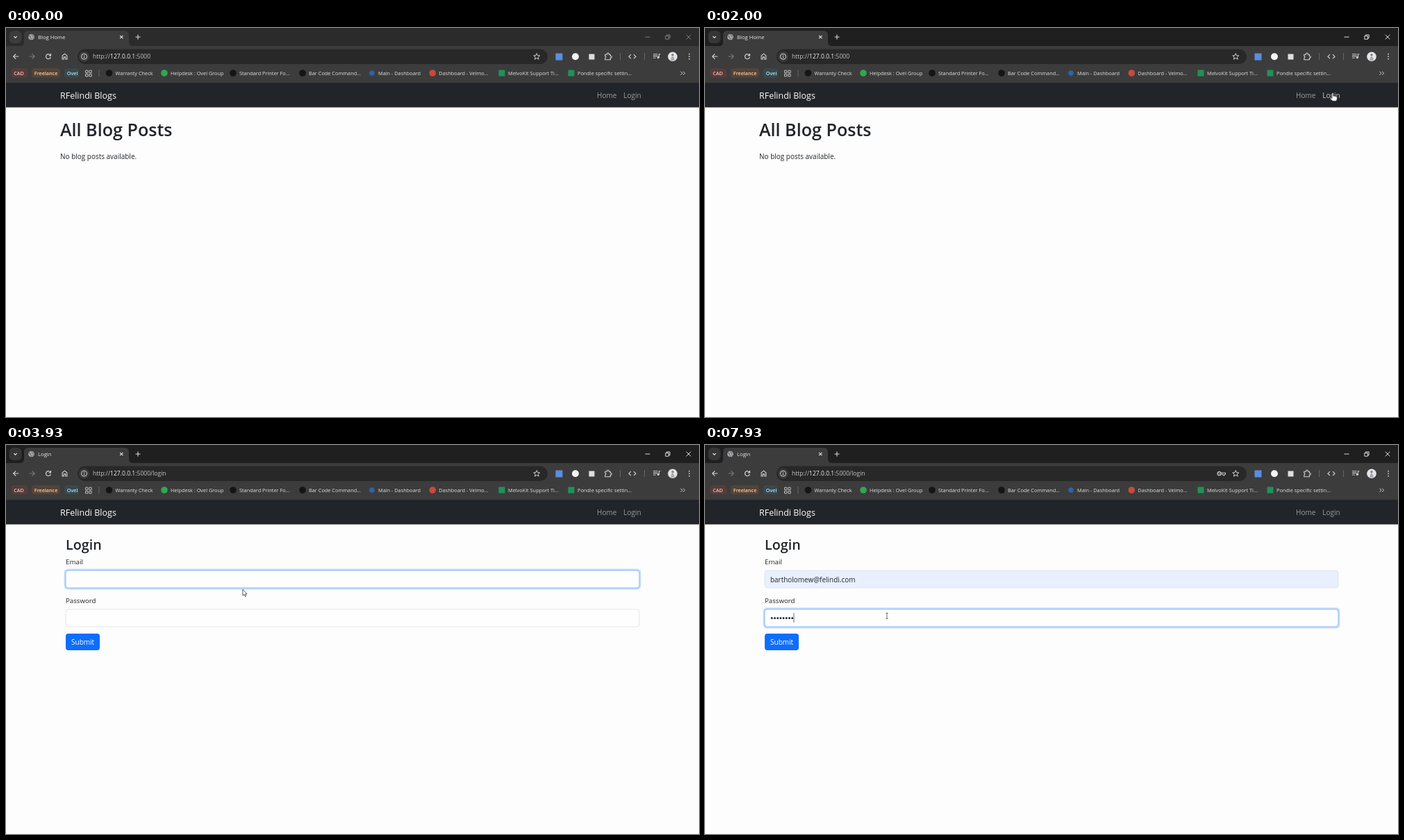
Recreate the animation shown at these times as an HTML page with a canvas. Size 998 by 561 pixels, loop 8000 ms.

```html
<!DOCTYPE html>
<html lang="en">
<head>
<meta charset="utf-8">
<title>Login walkthrough</title>
<style>
html, body { margin: 0; width: 100%; height: 100%; overflow: hidden; background: #fdfdfd; }
canvas { display: block; width: 998px; height: 561px; }
</style>
</head>
<body>
<canvas id="stage"></canvas>
<script>
const W = 998, H = 561, LOOP = 8000;
const canvas = document.getElementById('stage');
const ctx = canvas.getContext('2d');
const ratio = window.devicePixelRatio || 1;
canvas.width = Math.round(W * ratio);
canvas.height = Math.round(H * ratio);

const FONT = '"Open Sans", "Noto Sans", sans-serif';
const BAR = '#3c3c3c', ICON = '#d2d2d2', INK = '#212529';
const EMAIL = 'bartholomew@felindi.com';

// Moments of the story, in ms
const ACTIVE = 30, LOAD = 2400, FOCUS_EMAIL = 3100, FILL = 4130, FOCUS_PASS = 4800;
const KEYS = [6700, 6930, 7130, 7330, 7600, 7700, 7830, 7930];

// Pointer stops: time, x, y
const STOPS = [
  [30, 640, 328], [1030, 826.5, 158.5], [1130, 826.5, 158.5], [1730, 904, 93.5],
  [2400, 904, 93.5], [3070, 459, 190.5], [3730, 459, 190.5],
  [4100, 250, 222], [4200, 250, 222], [4530, 262, 246.5]
];

const clamp = v => Math.max(0, Math.min(1, v));
const ease = v => v * v * (3 - 2 * v);

function text(str, x, y, size, color, weight = 400) {
  ctx.font = `${weight} ${size}px ${FONT}`;
  ctx.fillStyle = color;
  ctx.fillText(str, x, y);
  return x + ctx.measureText(str).width;
}

function rect(x, y, w, h, color) {
  ctx.fillStyle = color;
  ctx.fillRect(x, y, w, h);
}

function round(x, y, w, h, r, fill, stroke, width = 1) {
  ctx.beginPath();
  ctx.roundRect(x, y, w, h, r);
  if (fill) { ctx.fillStyle = fill; ctx.fill(); }
  if (stroke) { ctx.strokeStyle = stroke; ctx.lineWidth = width; ctx.stroke(); }
}

function disc(x, y, r, fill, stroke, width = 1) {
  ctx.beginPath();
  ctx.arc(x, y, r, 0, Math.PI * 2);
  if (fill) { ctx.fillStyle = fill; ctx.fill(); }
  if (stroke) { ctx.strokeStyle = stroke; ctx.lineWidth = width; ctx.stroke(); }
}

// SVG path drawn around the point x, y
function shape(x, y, d, stroke, width = 1, fill) {
  const path = new Path2D(d);
  ctx.save();
  ctx.translate(x, y);
  if (fill) { ctx.fillStyle = fill; ctx.fill(path); }
  if (stroke) { ctx.strokeStyle = stroke; ctx.lineWidth = width; ctx.stroke(path); }
  ctx.restore();
}

function tabStrip(t, login) {
  const active = t >= ACTIVE;
  rect(0, 0, W, 27, active ? '#1f1f1f' : '#2b2b2b');
  round(4.5, 4, 18, 18, 6, active ? '#363636' : BAR);
  shape(13.5, 13, 'M-2.2-1L0 1.2L2.2-1', '#e0e0e0', 1.1);

  shape(0, 0, 'M20 26Q26 26 26 20V10Q26 4 32 4H171Q177 4 177 10V20Q177 26 183 26Z', null, 1, BAR);
  disc(36.5, 13, 4.3, '#a9adb1');
  shape(36.5, 13, 'M-3.5-1.5L-1-.8L-1.6 1L.3 2.6L-.4 3.8M.4-3.6L1.2-1.6L3.3-1M1.5 1.2L3.2 1.5', '#55595d', 1);
  text(login ? 'Login' : 'Blog Home', 46, 16, 7.7, '#e8e8e8');
  shape(166.3, 13, 'M-2.2-2.2L2.2 2.2M2.2-2.2L-2.2 2.2', '#e3e3e3', 1.1);
  shape(190, 13, 'M-3.5 0H3.5M0-3.5V3.5', '#dcdcdc', 1.1);

  const control = active ? '#f0f0f0' : '#868686';
  shape(924, 13, 'M-3.5 0H3.5', control, 0.9);
  shape(953, 13, 'M-3.2-1.4H1.4V3.2H-3.2ZM-1.6-1.5V-3.1H3.1V1.6H1.5', control, 0.9);
  shape(983, 13, 'M-3.3-3.3L3.3 3.3M3.3-3.3L-3.3 3.3', control, 0.9);
}

function addressBar(t, login) {
  rect(0, 26, W, 53, BAR);
  shape(14.3, 41, 'M4 0H-3.6M0-3.7L-3.7 0L0 3.7', ICON, 1.2);
  shape(37.5, 41, 'M-4 0H3.6M0-3.7L3.7 0L0 3.7', '#777', 1.2);
  shape(61, 41, 'M2.8-2A3.5 3.5 0 1 0 3.4 1M3.5-4V-1.2H.7', ICON, 1.2);
  shape(84.5, 41, 'M-3.4 4V-1L0-3.8L3.4-1V4H1.2V.9H-1.2V4Z', ICON, 1.1);

  round(103, 30.5, 677, 21.5, 10.75, '#282828');
  disc(112.5, 41.2, 7.5, BAR);
  disc(112.5, 41.2, 4, null, ICON, 1);
  shape(112.5, 41.2, 'M0-.4V2.2M0-2.3V-1.2', ICON, 1);
  let x = text('http://', 125, 44.3, 8.55, '#c4c4c4');
  x = text('127.0.0.1', x, 44.3, 8.55, '#f1f1f1');
  text(login ? ':5000/login' : ':5000', x, 44.3, 8.55, '#c4c4c4');

  if (t >= KEYS[0]) {
    disc(740.6, 41.2, 2.5, null, ICON, 1.2);
    disc(740.6, 41.2, 0.8, ICON);
    shape(743.3, 41.2, 'M0-1H6.2V1H5V2.7H2.8V1H0', ICON, 1);
  }
  shape(764.3, 41.2, 'M0-4.6L1.3-1.5L4.5-1.3L2 .8L2.9 4L0 2.2L-2.9 4L-2 .8L-4.5-1.3L-1.3-1.5Z', ICON, 1);

  rect(791.5, 36.5, 10, 10, '#5b8de0');
  disc(820, 41.3, 5, '#f4f4f4');
  rect(839.5, 37.5, 8, 8, '#dedede');
  shape(867, 41.3, 'M-4.2-3H-1.4V-4A1.3 1.3 0 0 1 1.2-4V-3H3.4V-.8H4A1.3 1.3 0 0 1 4 1.8H3.4V4.5H-4.2V2A1.5 1.5 0 0 0-4.2-.9Z', ICON, 1.1);
  rect(884, 36, 1, 10, '#666');
  shape(902, 41.2, 'M-2-3L-5 0L-2 3M2-3L5 0L2 3', ICON, 1.2);
  rect(919, 36, 1, 10, '#666');
  shape(937, 41, 'M-5-3.2H1.5M-5-.6H1.5M-5 2H-1.2M3.4 2V-3.2H5.4', ICON, 1.1);
  disc(939.2, 42.5, 1.6, ICON);

  disc(960, 41.2, 6.8, '#e4e5e8');
  disc(960, 38.8, 1.7, '#8d7c78');
  shape(960, 41, 'M-2.5 6Q-2.5 0 0 0Q2.5 0 2.5 6Z', null, 1, '#aaa9b2');
  for (const y of [37.7, 41.2, 44.7]) disc(984, y, 0.9, ICON);
}

function bookmarks() {
  const chips = [
    ['CAD', 7.5, 24, '#553c3b', '#f6c3bd'],
    ['Freelance', 37, 41, '#544337', '#f7cfaa'],
    ['Ovel', 84, 21, '#37494f', '#b9e3f1']
  ];
  for (const [label, x, w, back, ink] of chips) {
    round(x, 58, w, 13.5, 4, back);
    text(label, x + 3.8, 67.5, 7.2, ink, 600);
  }
  for (const x of [114.5, 119.8]) {
    for (const y of [61.2, 66.4]) round(x, y, 3.4, 3.4, 0.3, null, ICON, 0.9);
  }
  rect(133.5, 60, 1, 10, '#666');

  const links = [
    ['Warranty Check', 148.5, '#151515'],
    ['Helpdesk : Ovel Group', 228, '#2fa84f'],
    ['Standard Printer Fo...', 327, '#151515'],
    ['Bar Code Command...', 427, '#151515'],
    ['Main - Dashboard', 527, '#2f62a8'],
    ['Dashboard - Velmo...', 614.3, '#c9493d'],
    ['MelvoKit Support Ti...', 714, '#1f9258'],
    ['Pondle specific settin...', 814, '#1f9258']
  ];
  links.forEach(([label, x, color], i) => {
    if (i > 5) rect(x - 4.5, 60.5, 9, 9, color);
    else disc(x, 65, i === 4 ? 3.8 : 4.8, color);
    text(label, x + 9, 67.6, 7.35, '#e0e0e0');
  });
  shape(974.5, 65.2, 'M-3-2.5L-.5 0L-3 2.5M.6-2.5L3.1 0L.6 2.5', ICON, 1);
}

function navbar(hover) {
  rect(0, 79, W, 35.5, INK);
  text('RFelindi Blogs', 78, 101.7, 12.5, '#fdfdfd');
  text('Home', 851, 101, 10, '#9b9d9f');
  text('Login', 889.3, 101, 10, hover ? '#c8c9ca' : '#9b9d9f');
}

function field(y, focus, filled) {
  if (focus > 0) {
    ctx.globalAlpha = focus;
    round(83.6, y - 2.4, 830.8, 29.8, 5.5, '#c2dbfe');
    ctx.globalAlpha = 1;
  }
  round(86, y, 826, 25, 3.7, filled ? '#e8f0fe' : '#fefefe', focus > 0.5 ? '#86b7fe' : '#dee2e6', 0.9);
}

function caret(x, y, t, since) {
  if ((t - since) % 1000 < 500) rect(x, y - 7, 0.8, 14, '#44484c');
}

function loginPage(t) {
  const emailFocus = clamp((t - FOCUS_EMAIL) / 120) * (1 - clamp((t - FOCUS_PASS) / 120));
  const passFocus = clamp((t - FOCUS_PASS) / 120);
  const filled = t >= FILL;
  text('Login', 86, 151, 19.7, INK, 600);
  text('Email', 86, 172.4, 9.8, INK);
  field(181, emailFocus, filled);
  text('Password', 86, 228, 9.7, INK);
  field(237, passFocus, false);
  round(86, 272, 49, 24, 3.7, '#0d6efd');
  text('Submit', 94, 288.3, 10, '#fff');

  const end = filled ? text(EMAIL, 94, 197.8, 9.95, INK) : 94;
  if (t >= FOCUS_EMAIL && t < FOCUS_PASS) caret(end, 193.5, t, filled ? 4530 : FOCUS_EMAIL);

  const typed = KEYS.filter(k => t >= k);
  typed.forEach((k, i) => disc(96.3 + i * 4.2, 249.8, 1.45, INK));
  if (t >= FOCUS_PASS) {
    caret(94 + typed.length * 4.2, 249.2, t, typed.length ? typed[typed.length - 1] : FOCUS_PASS);
  }
}

function homePage() {
  text('All Blog Posts', 78, 156, 25.1, INK, 600);
  text('No blog posts available.', 78, 189.2, 9.98, INK);
}

function pointerAt(t) {
  let i = 0;
  while (i < STOPS.length - 2 && t >= STOPS[i + 1][0]) i++;
  const [t0, x0, y0] = STOPS[i], [t1, x1, y1] = STOPS[i + 1];
  const k = ease(clamp((t - t0) / (t1 - t0)));
  return { x: x0 + (x1 - x0) * k, y: y0 + (y1 - y0) * k };
}

function overLink(p) {
  return p.x > 886 && p.x < 918 && p.y > 87 && p.y < 107;
}

function overField(p) {
  return p.x > 86 && p.x < 912 && ((p.y > 181 && p.y < 206) || (p.y > 237 && p.y < 262));
}

function pointer(p, login) {
  if (overLink(p)) {
    shape(p.x, p.y, 'M-1 1Q-1 0 0 0Q1 0 1 1V4.4L4.6 5Q6.3 5.4 6.3 7V9L5.2 11.8H-.4L-3.6 8Q-3.8 6.4-2.5 6.9L-1 8Z', '#333', 0.8, '#fff');
  } else if (login && overField(p)) {
    shape(p.x, p.y, 'M-1.6-4H1.6M-1.6 4H1.6M0-4V4', '#4a4a4a', 0.8);
  } else {
    shape(p.x, p.y, 'M0 0V9L2 7.2L3.5 10.3L4.9 9.6L3.5 6.6H6.2Z', '#333', 0.8, '#fff');
  }
}

function draw(t) {
  const login = t >= LOAD;
  const p = pointerAt(t);
  ctx.setTransform(ratio, 0, 0, ratio, 0, 0);
  rect(0, 0, W, H, '#fdfdfd');
  tabStrip(t, login);
  addressBar(t, login);
  bookmarks();
  navbar(t >= ACTIVE && overLink(p));
  if (login) loginPage(t);
  else homePage();
  if (t >= ACTIVE) pointer(p, login);
}

const start = performance.now();
function tick() {
  draw((performance.now() - start) % LOOP);
  requestAnimationFrame(tick);
}
tick();
</script>
</body>
</html>
```
